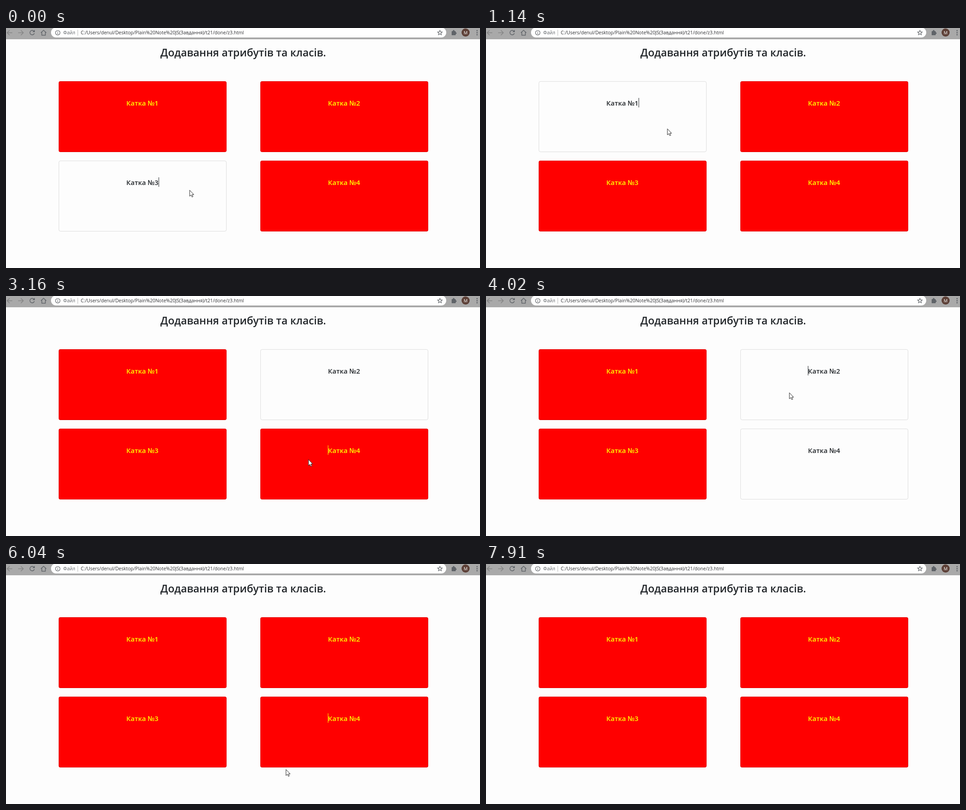
These frames come from a looping animation (1053x532 px, 8.01 s). An HTML page:

```html
<!DOCTYPE html>
<html lang="uk">
<head>
<meta charset="utf-8">
<title>Картки</title>
<style>
  html, body { margin: 0; width: 100%; height: 100%; overflow: hidden; background: #fdfdfd; }
  svg { display: block; font-family: "Open Sans", "Noto Sans", sans-serif; }
  .icon { fill: none; stroke: #5f6368; stroke-width: 1.5; }
  .thin { stroke-width: 1.2; }
  .off { stroke: #858585; }
  .grey { fill: #5f6368; }
  .url { font-size: 10.5px; fill: #303134; }
  .title { font-size: 23.3px; font-weight: 600; fill: #212529; }
  .label { font-size: 15.1px; font-weight: 600; }
  .edge { fill: none; stroke: rgba(0, 0, 0, .125); }
  .mid { text-anchor: middle; }
</style>
</head>
<body>
<svg width="1053" height="532" viewBox="0 0 1053 532">
  <rect width="1053" height="25" fill="#a9a9a9"/>
  <rect x="100" y="-1" width="878" height="22" rx="11" fill="#fff"/>
  <path class="icon off" d="M14 10.5H3M8 5 2.5 10.5 8 16M27 10.5H38M33 5 38.5 10.5 33 16"/>
  <path class="icon" d="M62 7A5 5 0 1 0 63 11.5"/>
  <path class="grey" d="M64 4V9H59Z"/>
  <path class="icon" d="M77.5 10.5 83.5 5 89.5 10.5M79.5 9.5V16H87.5V9.5"/>
  <circle class="icon thin" cx="115" cy="10.5" r="5"/>
  <path class="icon thin" d="M115 9.8V13.5M115 7.3V8.7"/>
  <text class="url" x="127" y="14" style="fill:#5f6368">Файл</text>
  <path d="M159.5 4V17" stroke="#b5b5b5"/>
  <text class="url" x="166" y="14">C:/Users/denul/Desktop/Plain%20Note%20JS(Завдання)/t21/done/z3.html</text>
  <path id="star" class="icon thin"/>
  <g class="grey">
    <rect x="990" y="7" width="9" height="9" rx="1"/>
    <circle cx="994.5" cy="6.5" r="2"/><circle cx="999" cy="11.5" r="2"/>
    <circle cx="1046.5" cy="6" r="1.4"/><circle cx="1046.5" cy="10.5" r="1.4"/><circle cx="1046.5" cy="15" r="1.4"/>
  </g>
  <circle cx="1021" cy="10" r="9" fill="#5d4037"/>
  <text class="mid" x="1021" y="13.5" font-size="9.5" fill="#fff">M</text>
  <text class="title mid" x="527" y="63">Додавання атрибутів та класів.</text>
  <g id="cards"></g>
  <rect id="caret" width="1" height="21"/>
  <path id="pointer" d="M0 .5V14L3.1 11.1 5.3 15.8 7.4 14.8 5.3 10.3H9.3Z" fill="#fff" stroke="#222"/>
</svg>
<script>
const LOOP = 8010, STEP = 143.6, BLINK = 530; // ms
const GLIDE = 3, HOLD = 2;                    // in steps
const OUT = [1096, 590];
const $ = id => document.getElementById(id);

// Where the pointer goes: at which step, to which point, and the card pressed there
const stops = [
  { at: 0, to: [408, 359], card: 2 },
  { at: 6, to: [403, 223], card: 0 },
  { at: 12, to: [620, 212], card: 1 },
  { at: 16, to: [422, 208], card: 0 },
  { at: 22, to: [672, 362], card: 3 },
  { at: 28, to: [674, 214], card: 1 },
  { at: 31, to: [658, 312], card: 3 },
  { at: 40, to: OUT },
  { at: 43, to: [456, 408], card: 2 },
  { at: 51, to: [456, 402], card: 2 },
  { at: 53, to: OUT }
];
const clicks = stops.filter(s => "card" in s);

$("star").setAttribute("d", "M" + Array.from({ length: 10 }, (_, i) => {
  const a = i * Math.PI / 5, r = i % 2 ? 2.4 : 5.4;
  return `${964 + r * Math.sin(a)} ${10.6 - r * Math.cos(a)}`;
}).join("L") + "Z");

const cards = [0, 1, 2, 3].map(i => {
  const x = i % 2 ? 565 : 117, y = i < 2 ? 118 : 294, centre = x + 186.5;
  const node = document.createElementNS("http://www.w3.org/2000/svg", "g");
  node.innerHTML = `<rect x="${x}" y="${y}" width="373" height="157" rx="4"/>
    <rect class="edge" x="${x + .5}" y="${y + .5}" width="372" height="156" rx="3.5"/>
    <text class="label mid" x="${centre - .5}" y="${y + 54}">Катка №${i + 1}</text>`;
  $("cards").append(node);
  return { box: node.firstChild, text: node.lastChild, y, centre };
});

function pointerAt(step) {
  const n = stops.findLastIndex(s => step >= s.at);
  const from = stops[n], next = stops[n + 1];
  if (!next) return from.to;
  const start = Math.max(from.at, next.at - GLIDE);
  const k = Math.max(0, (step - start) / (next.at - start));
  const ease = k * k * (3 - 2 * k);
  return from.to.map((v, j) => Math.round(v + (next.to[j] - v) * ease));
}

function draw(time) {
  const step = Math.floor((time % LOOP + 20) / STEP);

  // A card changes colour when the button is released
  const red = [true, true, false, true];
  for (const { at, card } of clicks) if (step >= at + HOLD) red[card] = !red[card];
  const ink = i => red[i] ? "#ff0" : "#212529";
  cards.forEach(({ box, text }, i) => {
    box.setAttribute("fill", red[i] ? "#f00" : "#fdfdfd");
    text.setAttribute("fill", ink(i));
  });

  // The caret lands on the end of the label nearest to the press
  const { at, to, card } = clicks.findLast(c => step >= c.at);
  const { centre, y } = cards[card];
  const lit = Math.floor((step - at) * STEP / BLINK) % 2 === 0;
  const caret = $("caret");
  caret.setAttribute("x", Math.floor(centre + 36 * Math.sign(to[0] - centre)));
  caret.setAttribute("y", y + 37);
  caret.setAttribute("fill", ink(card));
  caret.setAttribute("visibility", lit ? "visible" : "hidden");

  $("pointer").setAttribute("transform", `translate(${pointerAt(step)})`);
}

const begin = performance.now();
function tick() {
  draw(performance.now() - begin);
  requestAnimationFrame(tick);
}
tick();
</script>
</body>
</html>
```
